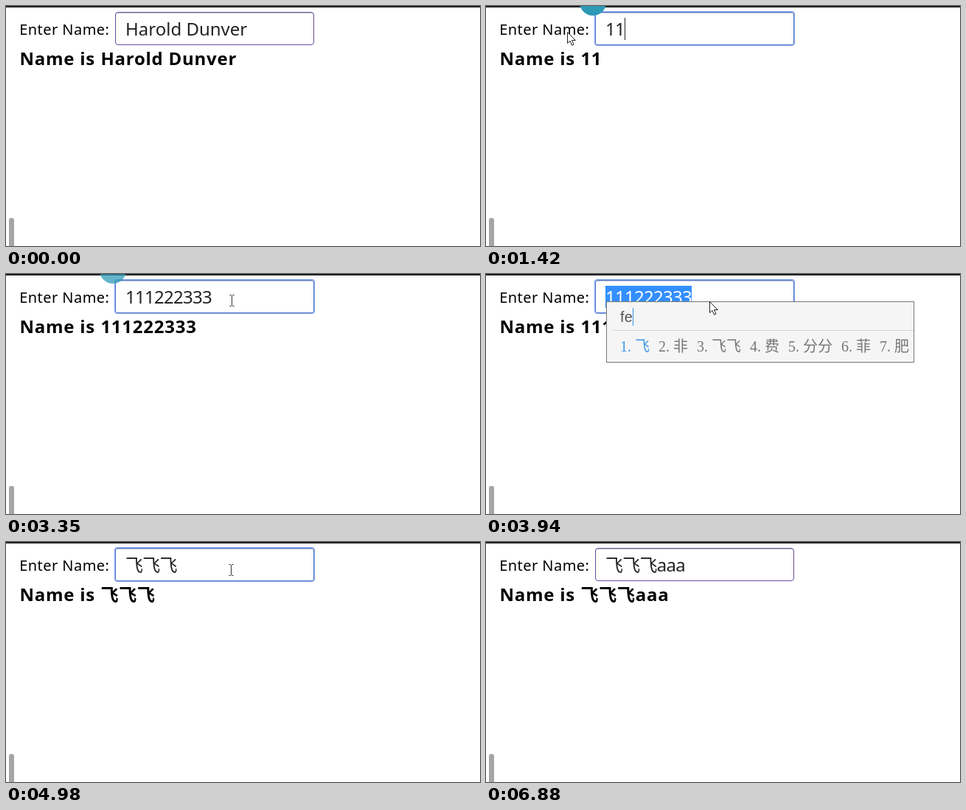
Recreate the animation shown at these times as an HTML page. Size 643 by 325 pixels, loop 7010 ms.

```html
<!DOCTYPE html>
<html lang="zh-CN">
<head>
<meta charset="utf-8">
<title>Name form</title>
<style>
html, body { margin: 0; width: 100%; height: 100%; overflow: hidden; background: #fff; }
body { position: relative; font: 24px/30px 'Noto Sans', 'Noto Sans CJK SC', 'Noto Sans CJK', sans-serif; color: #000; }
body > * { position: absolute; white-space: pre; }
#bar { left: 0; top: 0; width: 100%; height: 2px; background: #212124; }
#thumb { left: 4px; top: 287px; width: 7px; height: 60px; border-radius: 3px; background: #a6a6a6; }
#label { left: 18.2px; top: 17px; font-size: 20px; letter-spacing: .45px; }
.head { top: 56px; font-weight: 700; letter-spacing: .75px; }
#field { left: 148px; top: 8px; width: 268px; height: 43px; border: 1px solid #6b4fa3; border-radius: 4px; box-shadow: inset 0 1px 1px #bbb; }
#field.focus { border-color: #5275c8; border-radius: 3px; box-shadow: 0 0 0 1px #86a8ee, inset 0 1px 1px #b8c4e0; }
#value { left: 162px; top: 16px; color: #222; }
#value.caret { box-shadow: 1px 0 #222; }
#value.sel { background: #338fff; color: #fff; }
#ball { left: 126.8px; top: -23.2px; width: 36.4px; height: 36.4px; border-radius: 50%; background: #2e98b7; }
#ime { left: 163px; top: 37px; height: 81px; padding: 0 6px 0 18px; border: 1px solid #777; background: #f5f5f5; color: #777; font-size: 20px; }
#ime::before { content: ''; position: absolute; left: 9px; right: 0; top: 38px; height: 1px; background: #d2d4dc; }
#typed { position: absolute; top: 8px; height: 24px; line-height: 24px; color: #555; border-right: 1px solid #3a95e8; font-family: 'Liberation Sans', sans-serif; letter-spacing: .2px; }
#list { margin-top: 44px; font-family: 'Noto Sans CJK SC', 'Noto Sans CJK', sans-serif; font-weight: 300; }
#list span + span { margin-left: 12px; }
#list span:first-child { color: #3d97e8; }
#list b { display: inline-block; width: 20px; font: 20px/30px 'Liberation Serif', serif; }
#mouse { left: 0; top: 0; overflow: visible; }
</style>
</head>
<body>
<div id="thumb"></div>
<div id="label">Enter Name:</div>
<div id="field"></div>
<div id="value"></div>
<div class="head" style="left:18.4px">Name is</div>
<div class="head" id="echo" style="left:128.4px"></div>
<div id="bar"></div>
<div id="ball"></div>
<div id="ime"><div id="typed"></div><div id="list"></div></div>
<svg id="mouse" width="20" height="20">
  <path id="arrow" d="M.5 .5V15.5L4 12.3L6.6 18.2L9 17.1L6.5 11.5H11.3Z" fill="#fff" stroke="#222"/>
  <path id="beam" d="M-3 -7.5H-1L0 -6.5L1 -7.5H3M0 -6.5V6.5M-3 7.5H-1L0 6.5L1 7.5H3" fill="none" stroke="#333"/>
</svg>
<script>
const LOOP = 7010;
const $ = id => document.getElementById(id);
const during = (t, a, b) => t >= a && t < b;
const clamp = v => Math.max(0, Math.min(1, v));
const lastOf = (list, t) => list.filter(k => k[0] <= t).pop();

// [time, field text]
const keys = [[0, 'Harold Dunver']];
[1070, 1290, 1500, 1700, 1910, 2120, 2360, 2510, 2720]
  .forEach((t, i) => keys.push([t, '111222333'.slice(0, i + 1)]));
[4480, 5400, 5720, 5970].forEach((t, i) => keys.push([t, '飞飞飞' + 'a'.repeat(i)]));

// [time, pinyin, candidates]
const ime = [
  [3820, 'f', '分 飞 发 放 非常 方法 非'],
  [3940, 'fe', '飞 非 飞飞 费 分分 菲 肥'],
  [4090, "fe'f", '飞飞 分分 方法 纷纷 菲菲 非凡'],
  [4180, "fe'fe", '飞飞 纷纷 菲菲 分分 凤飞 非非'],
  [4280, "fe'fe'f", '飞飞飞 凤飞飞 纷纷 飞飞 菲菲 分分']
];

// [time, x, y, hold until the next point]
const path = [
  [110, 517, 1], [400, 400, 29], [690, 326, 34], [760, 322, 36, 1],
  [830, 118, 34, 1], [900, 110, 35, 1], [2510, 110, 35], [2850, 318, 37],
  [3150, 306, 36, 1], [3670, 303, 37, 1], [4520, 305, 38, 1],
  [5470, 310, 38, 1], [5720, 310, 38], [6400, 504, 14]
];

function mouseAt(t) {
  const i = path.findIndex(p => p[0] > t);
  const [a, b] = [path[i - 1], path[i]];
  const k = a[3] ? 0 : (t - a[0]) / (b[0] - a[0]);
  return [a[1] + (b[1] - a[1]) * k, a[2] + (b[2] - a[2]) * k];
}

function setHTML(el, html) {
  if (el.shown !== html) el.innerHTML = el.shown = html;
}

function draw(t) {
  const [keyTime, text] = lastOf(keys, t);
  const focus = during(t, 690, 6880);
  const selected = during(t, 830, 1070) || during(t, 3420, 4480);
  const blinkStart = keyTime || 690;
  const caret = focus && !selected && (t - blinkStart) % 1000 < 500;

  $('field').className = focus ? 'focus' : '';
  $('value').className = selected ? 'sel' : caret ? 'caret' : '';
  $('value').style.letterSpacing = keyTime ? '-.72px' : '0';
  setHTML($('value'), text);
  setHTML($('echo'), text);

  const fadeIn = clamp((t - 1070) / 350);
  const fadeOut = clamp((t - 3200) / 290);
  $('ball').style.opacity = fadeIn * (1 - fadeOut ** 2);

  const open = during(t, 3820, 4450);
  $('ime').style.display = open ? '' : 'none';
  if (open) {
    const [, typed, words] = lastOf(ime, t);
    setHTML($('typed'), typed);
    setHTML($('list'), words.split(' ').map((w, i) => `<span><b>${i + 1}.</b>${w}</span>`).join(''));
  }

  const visible = during(t, 110, 6400);
  $('mouse').style.display = visible ? '' : 'none';
  if (visible) {
    const [x, y] = mouseAt(t).map(Math.round);
    const beam = x > 147 && x < 419 && y > 7 && !during(t, 3670, 4520);
    $('mouse').style.transform = `translate(${x + (beam ? .5 : 0)}px, ${y}px)`;
    $('beam').style.display = beam ? '' : 'none';
    $('arrow').style.display = beam ? 'none' : '';
  }
}

const start = performance.now();
function tick() {
  draw((performance.now() - start) % LOOP);
  requestAnimationFrame(tick);
}
tick();
</script>
</body>
</html>
```
